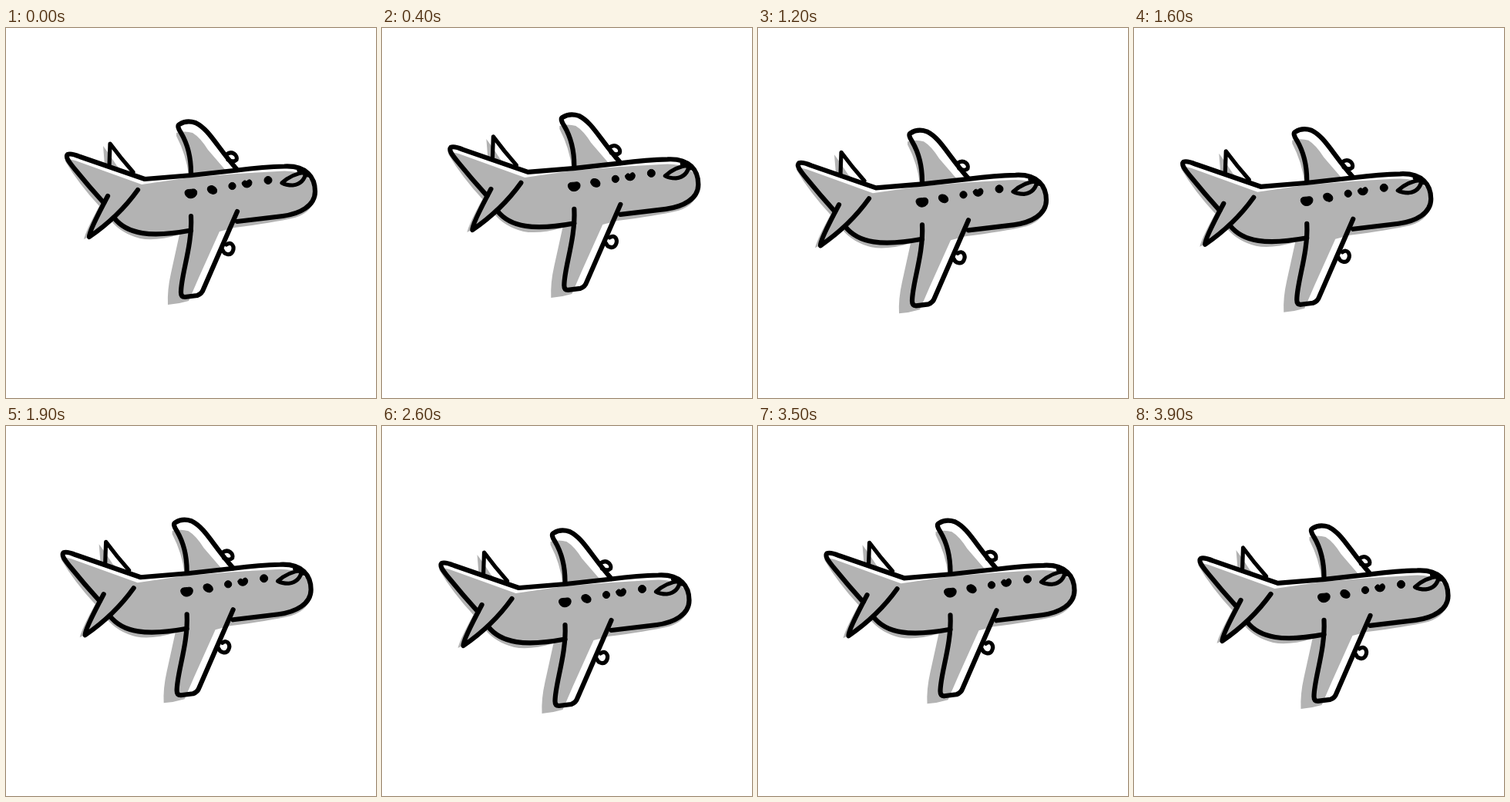
Write an HTML page that moves like this. It is 480 by 480 pixels and loops after 4 s.

```html
<!DOCTYPE html>
<html lang="en">
<head>
<meta charset="utf-8">
<title>Plane</title>
<style>
  html, body { margin: 0; height: 100%; overflow: hidden; background: #fff; }
  svg { display: block; width: 100vw; height: 100vh; }
  .shade { fill: #b3b3b3; }
  .line { fill: none; stroke: #000; stroke-width: 6.2; stroke-linecap: round; stroke-linejoin: round; }
  .thin { stroke-width: 5.2; }
  .windows { stroke: #000; }
</style>
</head>
<body>
<svg viewBox="0 0 480 480">
  <g id="plane">
    <g class="shade">
      <path d="M77 169L90 172L176 203L238 194L300 189L352 186Q376 184 389 192Q402 202 402 215Q400 238 375 246Q345 253 296 259L277 264L250 324L237 354Q224 358 210 359Q209 340 214 318L225 268Q194 277 174 273Q150 267 136 250Q122 264 101 274Q104 262 121 231Q94 202 77 173Z"/>
      <path d="M126 153L134 164L144 179L155 188L128 178Z"/>
      <path d="M221 136Q232 133 242 136Q252 142 262 158L287 187L237 191Q234 165 221 140Z"/>
    </g>
    <g class="line">
      <path d="M127 227Q107 205 90 184C80 172 77 167 80 164Q84 162 96 167Q140 182 180 196Q240 192 300 184.500Q335 180 361 179.500C390 178 401 194 401 212C401 231 381 241 359 244L300 251"/>
      <path d="M240 262.500C188 272 157 268 140 246"/>
      <path d="M171 210Q146 245 108 271Q107 265 132 218"/>
      <path class="thin" d="M134 179L135 150Q149 169 165 187"/>
      <path d="M240 188Q240 158 227 136Q221 127 225 125Q234 119 246 123C264 132 272 152 300 184"/>
      <path d="M240 244C242 282 227 320 227 343Q227 349 232 349L248 347Q254 345 256 339L300 238"/>
      <path class="thin" d="M286 164C294 158 301 166 299 171Q295 175 288 171"/>
      <path class="thin" d="M286 281C293 276 297 284 294 290C291 296 283 294 281 288"/>
      <path class="thin" d="M358 201Q371 189 389 187Q387 202 372 204Q363 204 358 201ZM380 185L391 191"/>
    </g>
    <g class="windows">
      <path d="M232 214C232 208 239 210 242 209C249 208 249 216 245 219C239 223 233 220 232 214Z"/>
      <ellipse cx="267.500" cy="210" rx="6.500" ry="5" transform="rotate(30 267.500 210)"/>
      <circle cx="293.500" cy="205" r="4.600"/>
      <path d="M306 201Q309 196 312 199Q317 194 319 200Q319 206 313 207Q307 207 306 201Z"/>
      <circle cx="340" cy="197.500" r="5"/>
    </g>
  </g>
</svg>
<script>
  // Turning points of the drift: [tenths of a second, pixels]
  const driftX = [[0, 0], [1.6, 20], [6.7, -3.5], [12, -27], [20, -4.5], [23, -8], [32, 14], [38, 5], [40, 8]];
  const driftY = [[0, 0], [1, 5.5], [5.5, -14], [13.8, 14.5], [19.5, 0], [26, 14], [32.2, -2], [39.4, 8]];
  const plane = document.getElementById("plane");

  function glide(points, t) {
    const next = points.findIndex(([time]) => time > t);
    const [t0, from] = points[next - 1], [t1, to] = points[next];
    return from + (to - from) * (1 - Math.cos(Math.PI * (t - t0) / (t1 - t0))) / 2;
  }

  function draw() {
    const step = Math.floor(performance.now() % 4000 / 100);
    plane.setAttribute("transform", `translate(${glide(driftX, step)} ${glide(driftY, step)})`);
    requestAnimationFrame(draw);
  }
  draw();
</script>
</body>
</html>
```
